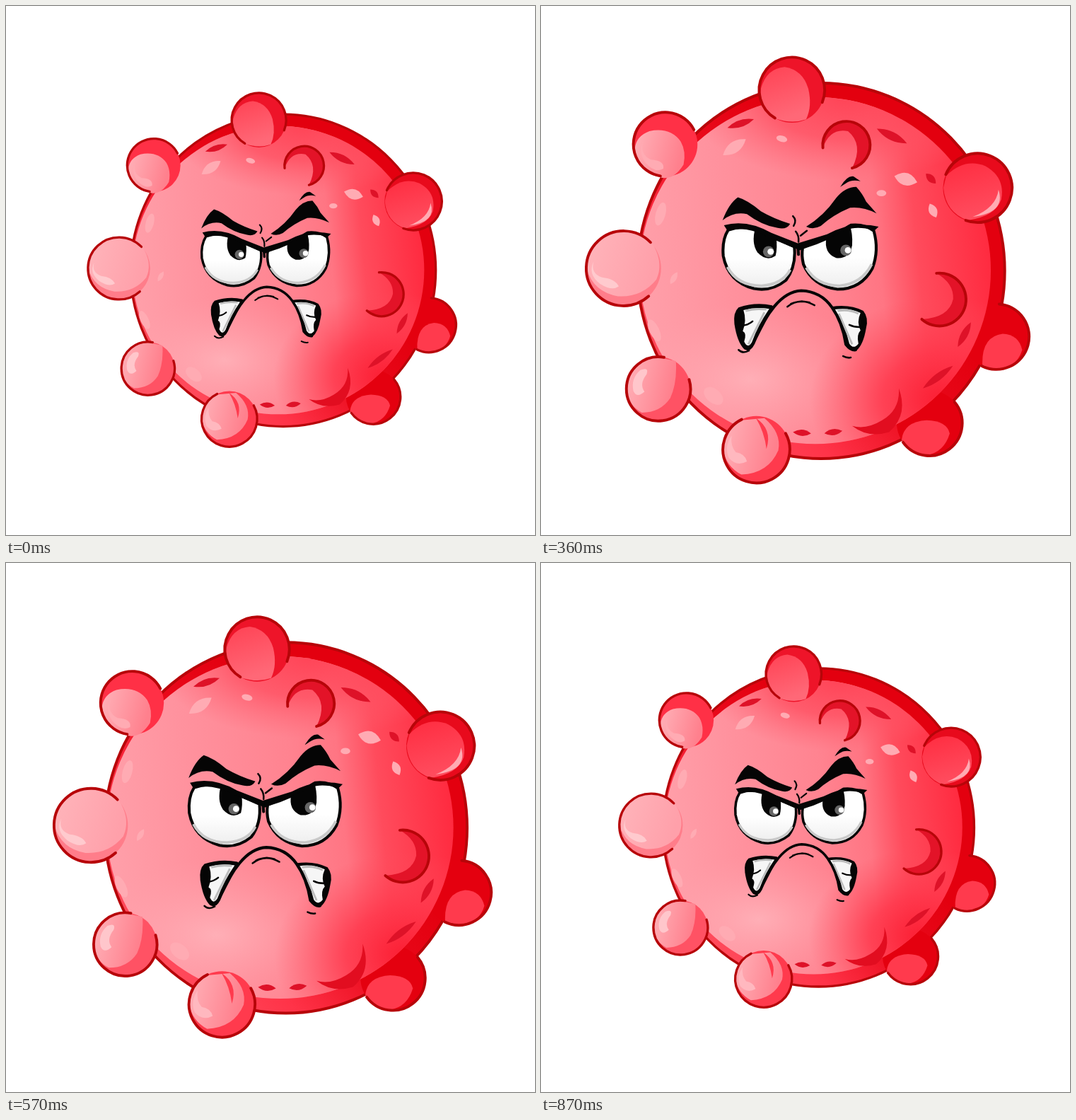
An HTML page for the animation above (900 ms loop, 748 px wide and 748 px high).

```html
<!DOCTYPE html>
<html lang="en">
<head>
<meta charset="utf-8">
<title>Angry germ</title>
<style>
html, body { margin: 0; width: 100%; height: 100%; overflow: hidden; background: #fff; }
svg { display: block; width: 748px; height: 748px; }
.line { fill: none; stroke: #b70509; stroke-width: 4; stroke-linecap: round; }
.red { fill: #ff3a4d; }
.spot { fill: #ffabb3; }
.mark { fill: #de1228; }
.ink { fill: #050505; }
.pen { fill: none; stroke: #050505; stroke-width: 4.2; stroke-linecap: round; stroke-linejoin: round; }
.thin { stroke-width: 2.6; }
</style>
</head>
<body>
<svg viewBox="0 0 748 748">
<defs>
  <linearGradient id="rim" gradientUnits="userSpaceOnUse" x1="200" y1="600" x2="500" y2="350">
    <stop offset="0" stop-color="#ff5262"/><stop offset=".35" stop-color="#ff3348"/>
    <stop offset=".68" stop-color="#ea0a1c"/><stop offset="1" stop-color="#e3000f"/>
  </linearGradient>
  <linearGradient id="skin" gradientUnits="userSpaceOnUse" x1="133" y1="400" x2="637" y2="350">
    <stop offset="0" stop-color="#ffa0aa"/><stop offset=".25" stop-color="#ff929e"/>
    <stop offset=".55" stop-color="#ff8390"/><stop offset=".69" stop-color="#ff7583"/>
    <stop offset=".8" stop-color="#ff4b5c"/><stop offset="1" stop-color="#ff2b40"/>
  </linearGradient>
  <radialGradient id="top" gradientUnits="userSpaceOnUse" cx="0" cy="0" r="1" gradientTransform="translate(430 125) scale(230 120)">
    <stop offset="0" stop-color="#ff4457"/><stop offset=".5" stop-color="#ff4d5f" stop-opacity=".75"/>
    <stop offset="1" stop-color="#ff6373" stop-opacity="0"/>
  </radialGradient>
  <radialGradient id="glow" gradientUnits="userSpaceOnUse" cx="0" cy="0" r="1" gradientTransform="translate(295 530) scale(190 110)">
    <stop offset="0" stop-color="#ffb4bb" stop-opacity=".85"/><stop offset="1" stop-color="#ffa0aa" stop-opacity="0"/>
  </radialGradient>
  <radialGradient id="low" gradientUnits="userSpaceOnUse" cx="0" cy="0" r="1" gradientTransform="translate(570 560) scale(190 150)">
    <stop offset="0" stop-color="#fb1e33"/><stop offset=".45" stop-color="#ff3449" stop-opacity=".8"/>
    <stop offset="1" stop-color="#ff4c5d" stop-opacity="0"/>
  </radialGradient>
  <linearGradient id="pale" x2="1" y2=".25">
    <stop offset="0" stop-color="#ffb2b9"/><stop offset="1" stop-color="#ff808d"/>
  </linearGradient>
  <linearGradient id="blush" x2="1" y2=".25">
    <stop offset="0" stop-color="#ffb5bb"/><stop offset="1" stop-color="#ffa0aa"/>
  </linearGradient>
  <linearGradient id="warm" x2=".3" y2="1">
    <stop offset="0" stop-color="#ff4254"/><stop offset="1" stop-color="#ff6877"/>
  </linearGradient>
  <linearGradient id="hot" x2=".3" y2="1">
    <stop offset="0" stop-color="#ff2c40"/><stop offset="1" stop-color="#ff4c5e"/>
  </linearGradient>
  <linearGradient id="eye" x2="0" y2="1">
    <stop offset=".5" stop-color="#fff"/><stop offset="1" stop-color="#ededed"/>
  </linearGradient>
</defs>
<!-- data-knob: centre x, y, radius, outline from and to in degrees, shade -->
<g id="germ">
  <ellipse class="line" style="fill:url(#rim)" cx="396.5" cy="374.5" rx="263.5" ry="269.5"/>
  <g data-knob="552 593 47 -40 144 #e4000f">
    <path class="red" d="M512 617Q515 591 548 589Q577 590 581 608Q573 635 548 639Q526 638 512 617z"/>
  </g>
  <g data-knob="648 469 47 -85 116 #e4000f">
    <path class="red" d="M628 511Q626 469 657 465Q680 466 685 488Q678 512 652 515Q638 515 628 511z"/>
  </g>
  <g id="lit"></g>
  <path fill="#e20d20" d="M508 543Q522 582 494 606Q464 615 441 597Q461 603 484 589Q510 574 508 543z"/>
  <g id="spots"></g>

  <g data-knob="354.5 115 47 121 382 #ee1429">
    <path fill="url(#warm)" d="M310 113Q318 84 344 82Q370 86 378 113Q384 138 375 157Q355 164 331 156Q307 138 310 113z"/>
  </g>
  <g data-knob="173 193 46 99 333 #ff3046">
    <path fill="url(#pale)" d="M129 199Q131 181 150 174Q180 168 195 189Q203 203 199 222Q184 246 165 240Q134 235 129 199z"/>
    <path class="spot" d="M141 189Q136 207 152 215Q172 216 170 228Q158 235 144 219Q133 203 141 189z"/>
  </g>
  <g data-knob="113 371 53.7 48 316 #ff7d8a">
    <path fill="url(#blush)" d="M60 372Q63 319 113 318Q145 319 157 340Q170 365 160 387Q139 413 105 411Q70 405 60 372z"/>
    <path fill="#ffcace" d="M70 361Q65 378 82 384Q101 386 106 397Q96 404 79 393Q61 379 70 361z"/>
  </g>
  <g data-knob="163 544 46 -17 280 #ff5264">
    <path fill="url(#pale)" d="M118 548Q119 503 163 499L188 504Q190 535 180 557Q166 578 139 578Q120 568 118 548z"/>
    <path fill="#ffc6cb" d="M137 517Q123 529 127 547Q132 558 143 548Q135 537 146 523Q150 512 137 517z"/>
  </g>
  <g data-knob="303.5 631 48 -29 244 #ff3a4d">
    <path fill="url(#pale)" d="M256 632Q258 602 282 589L315 586Q340 607 335 632Q321 665 282 667Q260 655 256 632z"/>
    <path class="red" d="M303 586Q327 602 318 630Q315 606 303 586z"/>
    <path fill="#ffb8bf" d="M268 611Q257 627 264 643Q275 656 290 648Q287 637 274 635Q266 626 268 611z"/>
  </g>
  <g data-knob="621 255.5 49.5 203 470 #e80a1c">
    <path fill="url(#hot)" d="M576 238Q602 212 632 224Q661 240 655 272Q647 296 607 302Q575 291 572 255z"/>
    <path class="spot" d="M651 258Q662 291 614 297Q648 284 651 258z"/>
  </g>

  <!-- small inner bumps -->
  <path fill="#e31328" d="M399 198A34 34 0 1 1 441 227Q458 193 435 174Q409 169 399 198z"/>
  <path class="line" d="M399 198A34 34 0 1 1 441 227"/>
  <path fill="#e31328" d="M562 378A38 38 0 1 1 541 444Q580 442 586 415Q587 392 562 378z"/>
  <path class="line" d="M562 378A38 38 0 1 1 541 444"/>

  <!-- brows -->
  <path class="ink" d="M255 302Q264 278 277 269Q291 273 310 289Q329 300 352 307Q347 316 334 313Q311 309 290 293Q271 289 255 302z"/>
  <path class="ink" d="M375 311Q400 296 418 270Q431 254 447 254Q456 264 461 275L476 292Q456 282 438 284Q414 294 396 310Q385 316 375 311z"/>
  <path class="ink" d="M424 254Q434 237 443 239L453 246Q440 243 432 249z"/>
  <path class="pen thin" d="M356 296Q362 302 357 310M360 318Q365 324 364 333M376 317L367 324"/>

  <!-- eyes -->
  <path class="pen" style="fill:url(#eye)" d="M263 316Q291 306 318 322L358 340Q361 368 346 388Q325 405 300 400Q263 390 256 353Q254 330 263 316z"/>
  <path class="pen" style="fill:url(#eye)" d="M370 341Q407 330 439 309Q459 307 472 317Q480 345 470 371Q454 401 420 401Q384 396 371 365Q368 352 370 341z"/>
  <path fill="none" stroke="#c9c9c9" stroke-width="4" d="M262 369Q276 396 311 396Q341 394 352 373M375 370Q390 396 423 396Q455 393 469 365"/>
  <path class="ink" d="M302 313Q296 335 305 348Q318 362 331 353Q334 342 332 326z"/>
  <path class="ink" d="M404 327Q400 349 418 356Q437 358 441 338Q442 319 437 308z"/>
  <g fill="#666"><circle cx="321" cy="347" r="8"/><circle cx="432" cy="345" r="8"/></g>
  <g fill="#fff"><circle cx="324" cy="347" r="4.5"/><circle cx="435" cy="345" r="4.5"/></g>
  <path class="ink" d="M257 309Q290 300 325 320L363 335L405 322Q440 303 479 311L474 316Q445 310 434 316L366 345L320 326Q288 309 262 317z"/>
  <path class="pen" d="M363 338L364 351"/>

  <!-- mouth -->
  <path class="ink" d="M326 424Q302 419 278 427Q270 434 272 451Q276 477 286 487Q293 491 299 482L328 426z"/>
  <path class="ink" d="M411 426Q438 422 457 432Q465 442 461 457Q457 481 447 489Q440 490 433 483Q427 449 411 426z"/>
  <path fill="#f6f6f6" d="M285 431Q302 426 322 429Q306 452 297 477Q291 487 286 476Q290 464 284 461Q290 446 285 431z"/>
  <path fill="#f6f6f6" d="M416 430Q437 427 453 435Q447 448 453 460Q447 466 450 479Q443 488 437 479Q430 450 416 430z"/>
  <path fill="none" stroke="#bcbcbc" stroke-width="3" d="M288 432Q301 428 318 430M420 432Q437 429 450 436M315 434L292 480M422 436L441 480"/>
  <path class="pen thin" d="M282 453Q291 453 298 447M455 455Q445 456 437 452"/>
  <path class="pen" d="M291 487Q297 486 302 472Q315 443 329 426Q347 404 368 403Q396 404 412 427Q427 448 432 480Q439 489 446 488"/>
  <path class="pen thin" d="M348 426Q366 412 387 424M353 422Q366 416 380 420M278 488Q284 494 293 489M428 497Q434 500 439 499"/>
</g>
</svg>
<script>
const byId = id => document.getElementById(id);
const svg = (tag, attrs) => {
  const el = document.createElementNS("http://www.w3.org/2000/svg", tag);
  for (const key in attrs) el.setAttribute(key, attrs[key]);
  return el;
};

for (const id of ["skin", "glow", "top", "low"])
  byId("lit").append(svg("ellipse", { cx: 388, cy: 374, rx: 252, ry: 249, fill: `url(#${id})` }));

// Each knob: shaded disc, its lit shapes, then an open outline
for (const knob of document.querySelectorAll("[data-knob]")) {
  const parts = knob.dataset.knob.split(" ");
  const [x, y, r, from, to] = parts.map(Number);
  const point = deg => {
    const a = deg * Math.PI / 180;
    return `${x + r * Math.cos(a)} ${y + r * Math.sin(a)}`;
  };
  const large = to - from > 180 ? 1 : 0;
  knob.prepend(svg("circle", { cx: x, cy: y, r, fill: parts[5] }));
  knob.append(svg("path", { class: "line", d: `M${point(from)}A${r} ${r} 0 ${large} 1 ${point(to)}` }));
}

// Leaf-shaped marks: x, y, half length, half width, angle
const leaves = (cls, list) => {
  for (const [x, y, l, w, a] of list)
    byId("spots").append(svg("path", {
      class: cls,
      d: `M${-l} 0Q0 ${-2 * w} ${l} 0Q0 ${2 * w} ${-l} 0z`,
      transform: `translate(${x} ${y}) rotate(${a})`
    }));
};
leaves("mark", [
  [498, 181, 24, 6, 26], [554, 242, 10, 5, 45], [281, 163, 20, 5, -18],
  [602, 466, 20, 5, -62], [564, 527, 27, 5, -37], [369, 607, 13, 4.5, 4], [414, 606, 13, 4.5, -8]
]);
leaves("spot", [
  [272, 197, 20, 8, -35], [518, 243, 17, 9, 15], [557, 288, 11, 6, 65],
  [185, 385, 10, 4, -60]
]);
for (const [x, y, rx, ry, a] of [[340, 185, 8, 4.5, 15], [483, 263, 7, 4.5, 0],
  [166, 293, 7, 17, 15], [157, 460, 7, 17, -25], [242, 554, 16, 10, 40]])
  byId("spots").append(svg("ellipse", { class: "spot", rx, ry, transform: `translate(${x} ${y}) rotate(${a})` }));

// Linear swell and shrink in 30 steps of 30 ms
const STEP = 30, STEPS = 30, DRAWN = 1.2214;
const germ = byId("germ");
const scaleAt = k => k <= 15 ? 1 + 0.01694 * k : 1.0034 + 0.01677 * (STEPS - k);

function draw(now) {
  const k = Math.floor(now / STEP) % STEPS;
  germ.setAttribute("transform",
    `translate(371.5 371) scale(${scaleAt(k) / DRAWN}) translate(-371.5 -371)`);
  requestAnimationFrame(draw);
}
draw(performance.now());
</script>
</body>
</html>
```
